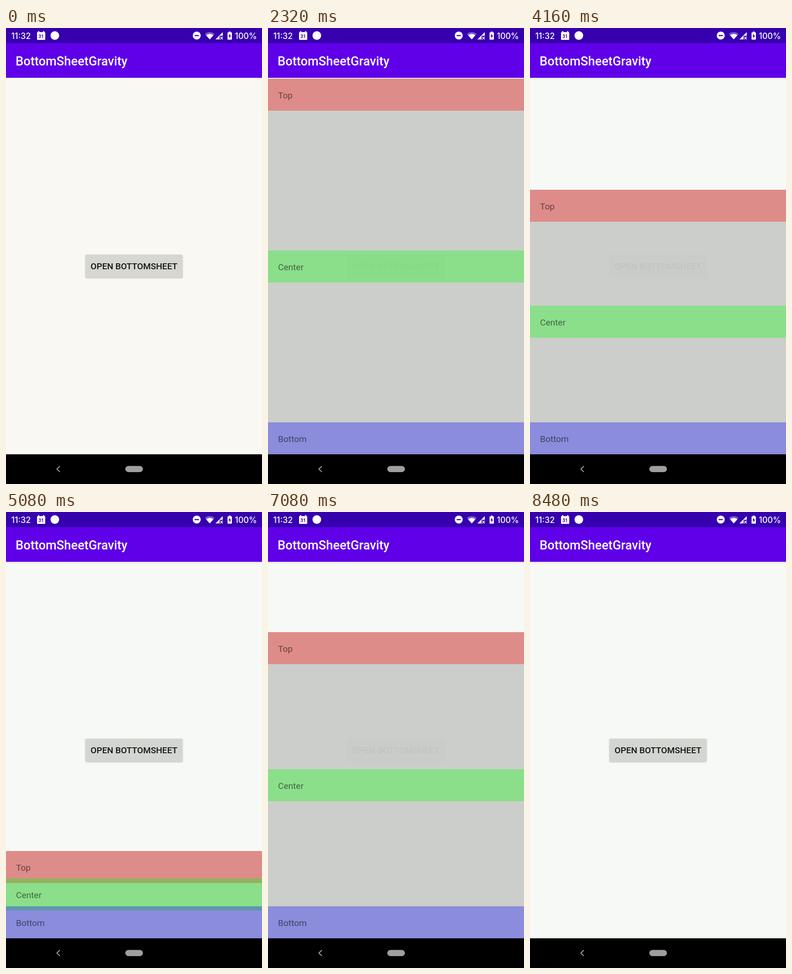
Recreate the animation shown at these times as an HTML page with a canvas. Size 561 by 998 pixels, loop 8.52 s.

```html
<!DOCTYPE html>
<html lang="en">
<head>
<meta charset="utf-8">
<title>BottomSheetGravity</title>
<style>
  html, body { margin: 0; width: 100%; height: 100%; overflow: hidden; background: #000; }
  canvas { display: block; width: 561px; height: 998px; }
</style>
</head>
<body>
<canvas id="stage" width="561" height="998"></canvas>
<script>
const ctx = document.getElementById('stage').getContext('2d');
const W = 561, H = 998, LOOP = 8520, STEP = 40;
const STATUS_H = 33, BAR_BOTTOM = 109, NAV_TOP = 933;
const ROW_H = 70, PEEK = 97;
const STATUS = '#3600ae', PRIMARY = '#5f00e8';
const ROBOTO = 'Roboto, sans-serif', INTER = 'Inter, sans-serif';

// [time, top edge of the sheet, true when the sheet settles by itself]
const keys = [
  [0, 933], [400, 933], [800, 836, true],
  [1560, 836], [2040, 109, true],
  [2280, 109], [3160, 553], [3640, 109, true],
  [3920, 109], [4160, 354], [4760, 759],
  [4920, 759], [5080, 742], [5400, 515], [5800, 750], [6280, 836, true],
  [6440, 836], [6960, 161], [7080, 263], [7320, 533], [7680, 109, true],
  [7840, 109], [8040, 424], [8280, 424], [8480, 933], [LOOP, 933]
];

const rate = i => (keys[i + 1][1] - keys[i][1]) / (keys[i + 1][0] - keys[i][0]);

// Monotone slope at a key: zero at turns and rests.
function slope(i) {
  if (i <= 0 || i >= keys.length - 1) return 0;
  const a = rate(i - 1), b = rate(i);
  return a * b > 0 ? 2 * a * b / (a + b) : 0;
}

function sheetTop(t) {
  let i = 0;
  while (i < keys.length - 2 && t >= keys[i + 1][0]) i++;
  const [t0, y0] = keys[i], [t1, y1, settles] = keys[i + 1];
  const d = t1 - t0, p = (t - t0) / d, q = 1 - p;
  if (settles) return y0 + (y1 - y0) * (1 - q ** 5);
  return y0 * (1 + 2 * p) * q * q + y1 * p * p * (3 - 2 * p)
    + d * (slope(i) * p * q * q - slope(i + 1) * p * p * q);
}

function rect(x, y, w, h, color) {
  ctx.fillStyle = color;
  ctx.fillRect(x, y, w, h);
}

function round(x, y, w, h, r, color) {
  ctx.fillStyle = color;
  ctx.beginPath();
  ctx.roundRect(x, y, w, h, r);
  ctx.fill();
}

function disc(x, y, r, color) {
  ctx.fillStyle = color;
  ctx.beginPath();
  ctx.arc(x, y, r, 0, Math.PI * 2);
  ctx.fill();
}

function poly(points, color) {
  ctx.fillStyle = color;
  ctx.beginPath();
  points.forEach(([x, y]) => ctx.lineTo(x, y));
  ctx.fill();
}

function line(points, width, color) {
  ctx.strokeStyle = color;
  ctx.lineWidth = width;
  ctx.beginPath();
  points.forEach(([x, y], i) => i ? ctx.lineTo(x, y) : ctx.moveTo(x, y));
  ctx.stroke();
}

function text(str, x, y, font, color, align = 'left') {
  ctx.font = font;
  ctx.fillStyle = color;
  ctx.textAlign = align;
  ctx.fillText(str, x, y);
}

function wifiFan(r, color) {
  ctx.fillStyle = color;
  ctx.beginPath();
  ctx.moveTo(446.5, 25);
  ctx.arc(446.5, 25, r, -Math.PI * 0.73, -Math.PI * 0.27);
  ctx.fill();
}

function drawStatus() {
  rect(0, 0, W, STATUS_H, STATUS);
  text('11:32', 11.5, 23.5, '500 18px ' + INTER, '#fff');

  round(68, 9, 18, 17, 1.5, '#fff');
  rect(70, 7, 3, 3, '#fff');
  rect(81, 7, 3, 3, '#fff');
  text('31', 77, 21.5, '700 10px ' + ROBOTO, STATUS, 'center');
  disc(107, 16.5, 9.5, '#fff');

  disc(418, 16.5, 8.7, '#fff');
  rect(413.5, 15.4, 9, 2.4, STATUS);

  wifiFan(16, 'rgba(255,255,255,.35)');
  wifiFan(12, '#fff');

  poly([[475, 9], [475, 17], [468, 17], [468, 25], [459, 25]], '#fff');
  line([[469.5, 19], [475, 25]], 1.6, '#fff');
  line([[475, 19], [469.5, 25]], 1.6, '#fff');

  round(485.5, 9.5, 9.5, 16, 1.2, '#fff');
  rect(488.3, 7.8, 4, 2, '#fff');
  poly([[491, 12], [487.5, 18.5], [489.8, 18.5], [489.8, 23], [493.2, 16.6], [491, 16.6]], STATUS);

  text('100%', 550, 23.5, '500 18px ' + INTER, '#fff', 'right');
}

function drawAppBar() {
  rect(0, STATUS_H, W, BAR_BOTTOM - STATUS_H, PRIMARY);
  text('BottomSheetGravity', 21, 81.5, '500 27.3px ' + ROBOTO, '#fff');
}

function drawPage(fresh) {
  rect(0, BAR_BOTTOM, W, NAV_TOP - BAR_BOTTOM, fresh ? '#f9f8f3' : '#f7f9f6');
  if (!fresh) {
    const shade = ctx.createLinearGradient(0, BAR_BOTTOM, 0, BAR_BOTTOM + 5);
    shade.addColorStop(0, 'rgba(0,0,0,.07)');
    shade.addColorStop(1, 'rgba(0,0,0,0)');
    rect(0, BAR_BOTTOM, W, 5, shade);
  }
  ctx.save();
  ctx.shadowColor = 'rgba(0,0,0,.22)';
  ctx.shadowBlur = 3;
  ctx.shadowOffsetY = 1;
  round(174, 496, 213, 50.5, 2.5, fresh ? '#d5d7d0' : '#d3d5d1');
  ctx.restore();
  text('OPEN BOTTOMSHEET', 280.5, 528.3, '500 19.1px ' + ROBOTO, '#141514', 'center');
}

function drawRow(label, y, rgb) {
  rect(0, y, W, ROW_H, `rgba(${rgb},.32)`);
  text(label, 22, y + 42.5, '400 19.1px ' + ROBOTO, 'rgba(0,0,0,.54)');
}

function drawSheet(top) {
  if (top >= NAV_TOP) return;
  const bottom = Math.max(NAV_TOP, top + PEEK);
  rect(0, top, W, bottom - top, 'rgba(202,204,201,.955)');
  drawRow('Top', top, '255,0,0');
  drawRow('Center', Math.floor((top + bottom - ROW_H) / 2), '0,255,0');
  drawRow('Bottom', bottom - ROW_H, '0,0,255');
}

function drawNav() {
  rect(0, NAV_TOP, W, H - NAV_TOP, '#000');
  line([[118, 959], [111.5, 965.3], [118, 971.6]], 2, '#a0a09e');
  round(261.5, 958.5, 38.5, 13.5, 6.75, '#9f9f9d');
}

function draw(t) {
  drawPage(t < 440);
  drawSheet(Math.floor(sheetTop(t) + 0.1));
  drawStatus();
  drawAppBar();
  drawNav();
}

const start = performance.now();
function tick() {
  const t = (performance.now() - start) % LOOP;
  draw(Math.floor(t / STEP) * STEP);
  requestAnimationFrame(tick);
}
tick();
</script>
</body>
</html>
```
